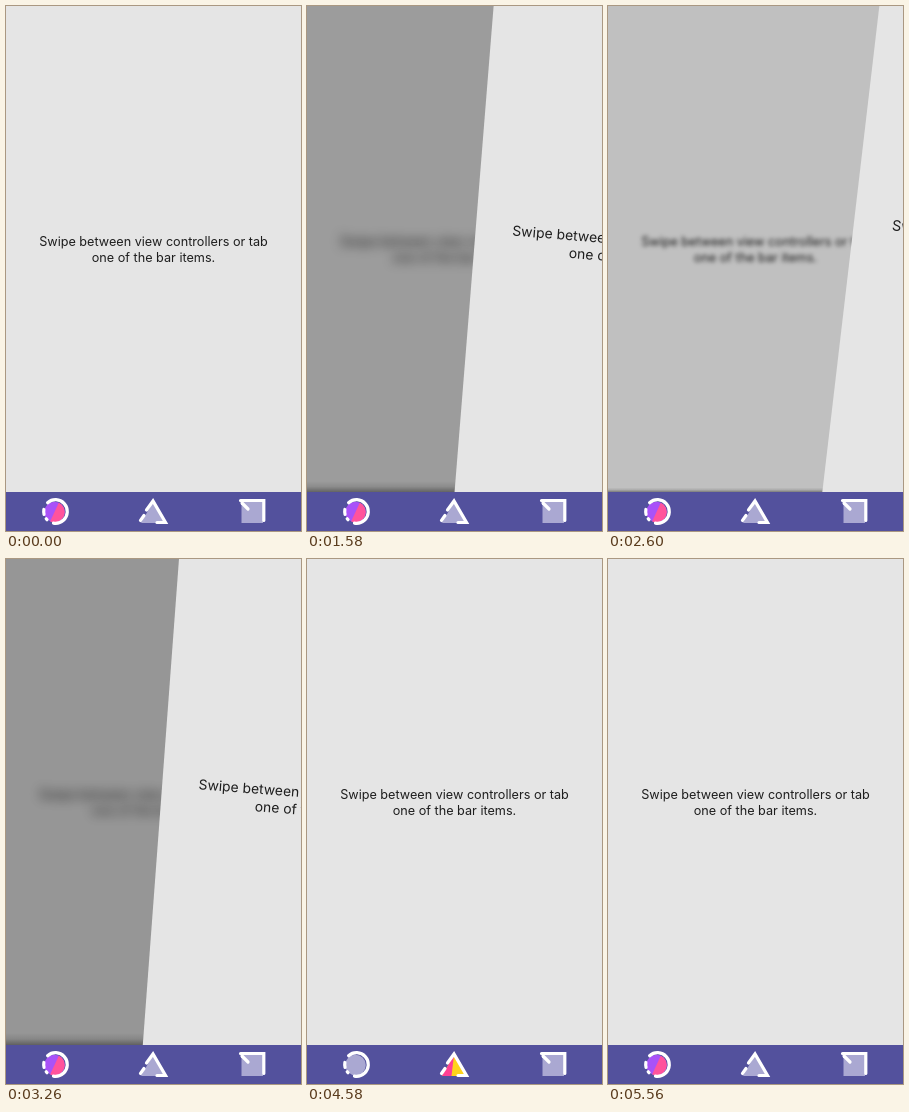
Animation of 295x525 px, one loop 5.58 s. Source, as an HTML page with a canvas:

```html
<!DOCTYPE html>
<html lang="en">
<head>
<meta charset="utf-8">
<title>Swipe tabs</title>
<style>
  html, body { margin: 0; width: 100%; height: 100%; overflow: hidden; background: #e5e5e5; }
  canvas { display: block; width: 295px; height: 525px; }
</style>
</head>
<body>
<canvas id="stage"></canvas>
<script>
const W = 295, H = 525, BAR = 486, LOOP = 5580;
const CX = W / 2, CY = 243.5;
const TRAVEL = 350;               // distance of a fully hidden page
const PAGE = '#e5e5e5', INK = '#1e1e1e', LILAC = '#aaa8d2', WHITE = '#fff';

const canvas = document.getElementById('stage');
const ctx = canvas.getContext('2d');
const dpr = window.devicePixelRatio || 1;
canvas.width = W * dpr;
canvas.height = H * dpr;

const easeOut = power => u => 1 - Math.pow(1 - u, power);
const easeInOut = u => (1 - Math.cos(Math.PI * u)) / 2;

// Drag in, pause, drag back, pause, finish; then return from the left.
const moves = [
  { start: 320, end: 1580, from: 350, to: 183, ease: easeOut(1.6) },
  { start: 1920, end: 2840, from: 183, to: 282, ease: easeInOut },
  { start: 3000, end: 3600, from: 282, to: 0, ease: easeInOut },
  { start: 5000, end: 5520, from: -350, to: 0, ease: easeOut(2) }
];

function offsetAt(t) {
  let offset = 0;
  for (const m of moves) {
    if (t < m.start) break;
    const u = Math.min(1, (t - m.start) / (m.end - m.start));
    offset = m.from + (m.to - m.from) * m.ease(u);
  }
  return offset;
}

function label() {
  ctx.fillStyle = INK;
  ctx.font = '12.65px Inter, "Open Sans", sans-serif';
  ctx.textAlign = 'center';
  ctx.textBaseline = 'alphabetic';
  ctx.fillText('Swipe between view controllers or tab', CX, 240);
  ctx.fillText('one of the bar items.', CX, 256);
}

function pageBelow(shown) {
  const sigma = 14 * Math.pow(shown, 1.27);
  ctx.save();
  if (sigma > 0.1) ctx.filter = `blur(${sigma * dpr}px)`;
  label();
  ctx.restore();

  ctx.fillStyle = `rgba(0,0,0,${0.67 * shown})`;
  ctx.fillRect(0, 0, W, H);

  const depth = Math.max(0.5, 2 * sigma);
  const shade = ctx.createLinearGradient(0, BAR - depth, 0, BAR);
  shade.addColorStop(0, 'rgba(0,0,0,0)');
  shade.addColorStop(0.5, 'rgba(0,0,0,0.1)');
  shade.addColorStop(1, 'rgba(0,0,0,0.36)');
  ctx.fillStyle = shade;
  ctx.fillRect(0, BAR - depth, W, depth);
}

function pageAbove(offset) {
  const p = offset / TRAVEL;
  const zoom = 1 + 0.2 * Math.abs(p);
  ctx.save();
  ctx.translate(CX + offset, CY);
  ctx.rotate(p * 8.79 * Math.PI / 180);
  ctx.scale(zoom, zoom);
  ctx.translate(-CX, -CY);
  ctx.fillStyle = PAGE;
  ctx.fillRect(0, -20, W, H + 40);
  label();
  ctx.restore();
}

function poly(points, close) {
  ctx.beginPath();
  points.forEach(([x, y]) => ctx.lineTo(x, y));
  if (close) ctx.closePath();
}

function strokeWhite(width = 3.2) {
  ctx.lineWidth = width;
  ctx.strokeStyle = WHITE;
  ctx.stroke();
}

function line(points, width) {
  poly(points);
  strokeWhite(width);
}

function fillShape(points, color) {
  poly(points, true);
  ctx.fillStyle = color;
  ctx.fill();
}

function ring(from, to) {
  ctx.beginPath();
  ctx.arc(49.5, 505.5, 11.8, from * Math.PI / 180, to * Math.PI / 180);
  strokeWhite();
}

function circleIcon(active) {
  ctx.save();
  ctx.beginPath();
  ctx.arc(48.5, 506, 10.3, 0, 7);
  ctx.clip();
  ctx.fillStyle = active ? '#a952f8' : LILAC;
  ctx.fillRect(34, 492, 30, 30);
  if (active) fillShape([[55, 492], [66, 492], [66, 520], [42, 520]], '#ff539c');
  ctx.restore();
  ring(-132, 100);
  ring(136, 142);
  ring(166, 190);
}

function triangleIcon(active) {
  fillShape([[147, 496], [159, 517], [135, 517]], active ? '#ffd31a' : LILAC);
  if (active) fillShape([[147, 496], [144.5, 517], [135, 517]], '#ff3f94');
  line([[140.5, 504], [147, 495], [159.5, 516.5], [151, 516.5]]);
  line([[134.5, 514.5], [138, 509.5]]);
}

function squareIcon() {
  fillShape([[235.5, 496], [257, 496], [257, 517], [235.5, 517]], LILAC);
  line([[234.5, 494.5], [257.8, 494.5], [257.8, 514.5]]);
  line([[236, 497], [242, 503]]);
}

function tabBar(active) {
  ctx.fillStyle = '#53519d';
  ctx.fillRect(0, BAR, W, H - BAR);
  ctx.lineCap = 'round';
  ctx.lineJoin = 'miter';
  circleIcon(active === 0);
  triangleIcon(active === 1);
  squareIcon();
}

function draw(t) {
  ctx.setTransform(dpr, 0, 0, dpr, 0, 0);
  ctx.fillStyle = PAGE;
  ctx.fillRect(0, 0, W, H);
  const offset = offsetAt(t);
  if (offset) {
    pageBelow(1 - Math.abs(offset) / TRAVEL);
    pageAbove(offset);
  } else {
    label();
  }
  tabBar(t >= 3300 && t < 5000 ? 1 : 0);
}

const origin = performance.now();
function tick() {
  draw((performance.now() - origin) % LOOP);
  requestAnimationFrame(tick);
}
tick();
</script>
</body>
</html>
```
